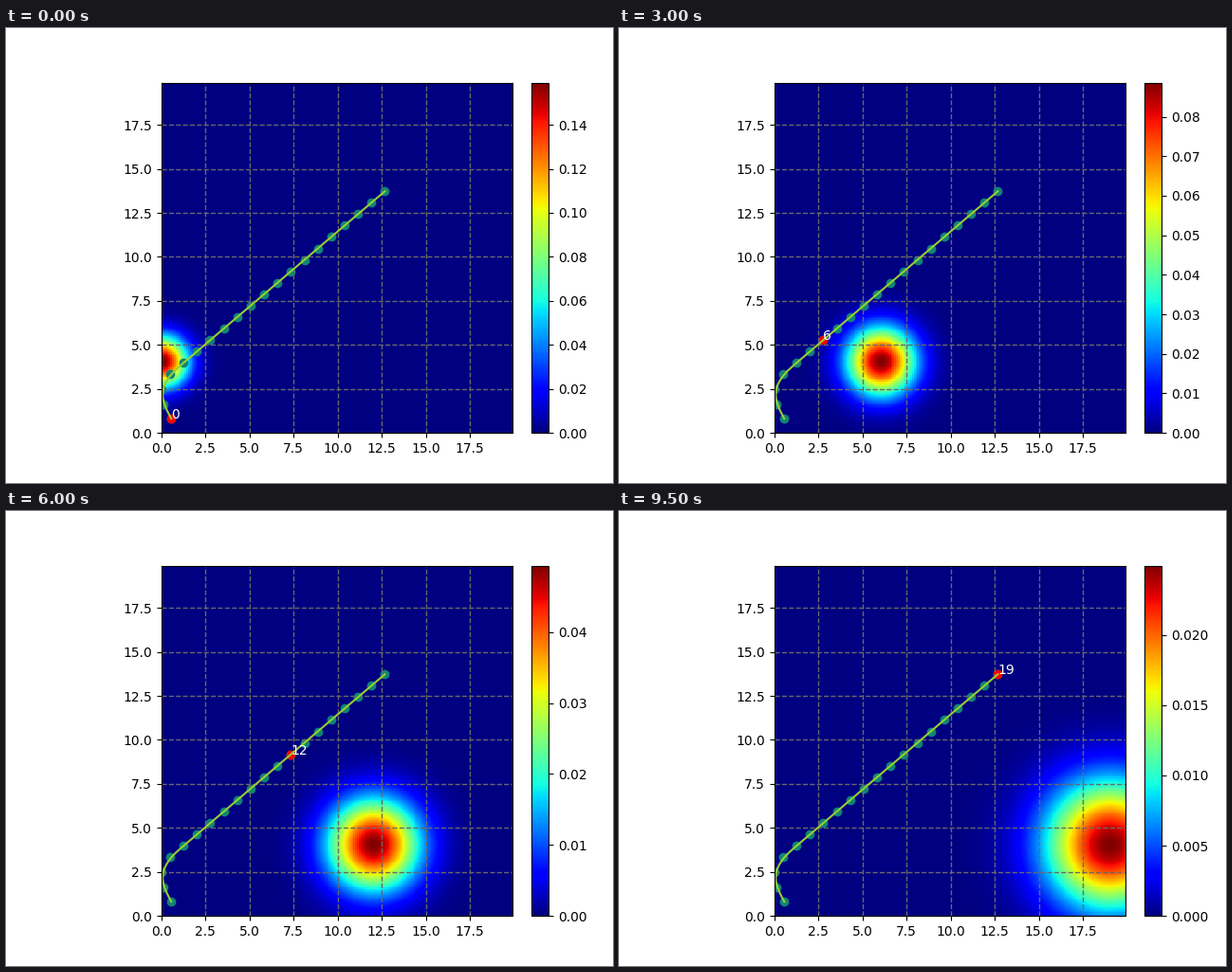
These frames come from a looping animation (640 by 480 pixels, 10000 ms). A matplotlib script:

```python
import numpy as np
import matplotlib.pyplot as plt
from matplotlib.animation import FuncAnimation
from mpl_toolkits.axes_grid1 import make_axes_locatable

STEPS = 20
GRID = np.arange(0, 20, 0.1)
X, Y = np.meshgrid(GRID[:-1], GRID[:-1])


def density(step):
    """Gaussian moving right one unit per step while it widens by 5 %."""
    var = 1.05 ** (2 * step)
    r2 = (X - step) ** 2 + (Y - 4) ** 2
    return np.exp(-r2 / (2 * var)) / (2 * np.pi * var)


def waypoints():
    bend = np.array([[0.556, 0.81], [0.11, 1.65], [0.0, 2.47]])
    k = np.arange(STEPS - len(bend))[:, None]
    straight = np.array([0.488, 3.33]) + k * np.array([0.762, 0.65])
    return np.vstack([bend, straight])


def bspline(points, samples=12):
    """Uniform cubic B-spline pinned to both end points."""
    p = np.vstack([points[:1]] * 2 + [points] + [points[-1:]] * 2)
    t = np.linspace(0, 1, samples)[:, None]
    basis = [(1 - t) ** 3, 3 * t**3 - 6 * t**2 + 4,
             -3 * t**3 + 3 * t**2 + 3 * t + 1, t**3]
    return np.vstack([
        sum(b * p[i + j] for j, b in enumerate(basis)) / 6
        for i in range(len(p) - 3)
    ])


fig, ax = plt.subplots(figsize=(6.4, 4.8), dpi=100)
fig.subplots_adjust(left=0.25, right=0.9, bottom=0.11, top=0.88)
ax.set_aspect("equal")
cax = make_axes_locatable(ax).append_axes("right", size="5%", pad=0.2)

path = waypoints()
curve = bspline(path)
mesh = ax.pcolormesh(GRID, GRID, density(0), cmap="jet", shading="flat")
mesh.set_clim(0, density(0).max())
fig.colorbar(mesh, cax=cax)

ax.scatter(*path.T, color="#0f8575")
current = ax.scatter(*path[0], color="red")
ax.plot(*curve.T, color="yellowgreen")
label = ax.text(*path[0], "0", color="white")
ax.grid(color="dimgray", linestyle="--", linewidth=1)
ax.set_xlim(0, 19.9)
ax.set_ylim(0, 19.9)


def update(step):
    z = density(step)
    mesh.set_array(z)
    mesh.set_clim(0, z.max())
    current.set_offsets(path[step:step + 1])
    label.set_position(path[step])
    label.set_text(str(step))
    return mesh, current, label


anim = FuncAnimation(fig, update, frames=STEPS, interval=500, repeat=True)
plt.show()
```
